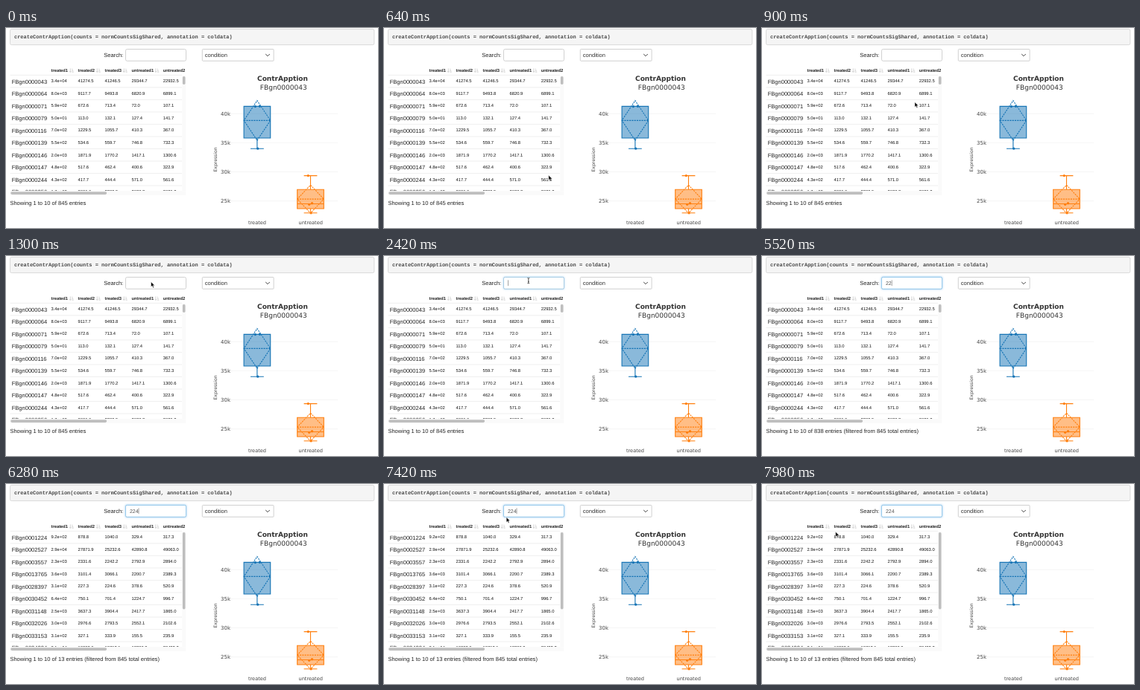
Write an HTML page that moves like this. It is 499x269 px and loops after 8 s.

```html
<!DOCTYPE html>
<html lang="en">
<head>
<meta charset="utf-8">
<title>Expression table and box plot</title>
<style>
html, body { margin: 0; width: 100%; height: 100%; overflow: hidden; background: #fff; }
svg { display: block; width: 499px; height: 269px; text-rendering: geometricPrecision; }
text { font-family: "Liberation Sans", Arial, sans-serif; font-size: 7.56px; fill: #222; white-space: pre; }
.code { font: bold 6.98px "Liberation Mono", monospace; fill: #484848; }
.value { font-size: 5.8px; fill: #111; }
.head { font-size: 5.8px; font-weight: bold; }
.field { fill: #fff; stroke: #c6c6c6; stroke-width: .8; }
.entry { font-size: 6.95px; fill: #555; }
.plot text { font-family: "DejaVu Sans", Verdana, sans-serif; font-size: 6.6px; fill: #444; text-anchor: middle; }
.plot .tick { font-size: 7px; text-anchor: end; }
.plot .title { font-size: 9.03px; fill: #333; }
.plot .axis { font-size: 6.1px; }
.bar { fill: #bebebe; }
.rule { stroke: #e4e4e4; stroke-width: .6; }
</style>
</head>
<body>
<svg viewBox="0 0 499 269">
  <defs>
    <clipPath id="tableClip"><rect x="5" y="62" width="231" height="157"/></clipPath>
    <filter id="blur" x="-10%" y="-50%" width="120%" height="200%"><feGaussianBlur stdDeviation="1.2"/></filter>
  </defs>
  <rect x="5.5" y="1.6" width="488.4" height="21" rx="2" fill="#f5f5f5" stroke="#ccc" stroke-width=".7"/>
  <text class="code" x="11" y="14.4">createContrApption(counts = normCountsSigShared, annotation = coldata)</text>

  <text x="131.2" y="38.9">Search:</text>
  <rect class="field" x="160.5" y="28.5" width="81" height="15.8" rx="2"/>
  <g id="focus" opacity="0">
    <rect x="160.5" y="28.5" width="81" height="15.8" rx="2" fill="none" stroke="#66afe9" stroke-opacity=".55" stroke-width="1.8" filter="url(#blur)"/>
    <rect x="160.5" y="28.5" width="81" height="15.8" rx="2" fill="#fff" stroke="#84c3ec" stroke-width=".8"/>
  </g>
  <text id="query" class="entry" x="166" y="39"></text>
  <rect id="caret" y="32.4" width=".6" height="7.8" fill="#666"/>

  <rect class="field" x="263.3" y="28.5" width="95.8" height="15.8" rx="1"/>
  <text x="266.8" y="38.9" style="fill:#333">condition</text>
  <path d="M348.2 35l2.8 2.8 2.8-2.8" fill="none" stroke="#444" stroke-width="1"/>

  <g id="header"></g>
  <path class="rule" d="M5.5 63.4H236"/>
  <g clip-path="url(#tableClip)"><g id="allRows"></g><g id="foundRows"></g></g>
  <rect x="236.2" y="64" width="5" height="155" fill="#fafafa"/>
  <rect x="5.5" y="219.2" width="235.7" height="5.6" fill="#fafafa"/>
  <rect id="thumb" class="bar" x="236.9" y="65" width="3.6" rx="1.8"/>
  <rect class="bar" x="6.2" y="220.3" width="129" height="3.6" rx="1.8"/>
  <text id="info" x="5.4" y="237.7"></text>

  <g class="plot" id="plot">
    <text class="title" x="371" y="70.8" font-weight="bold">ContrApption</text>
    <text class="title" x="372.3" y="83">FBgn0000043</text>
    <text class="axis" transform="translate(282.5 177) rotate(-90)">Expression</text>
    <text x="337" y="264.2">treated</text>
    <text x="408.7" y="264.2">untreated</text>
  </g>

  <g id="cursor">
    <path id="arrow" d="M0 0V6.7L1.6 5.3 2.7 7.9 3.9 7.4 2.8 4.9H4.9Z" fill="#000" stroke="#fff" stroke-width=".5"/>
    <path id="beam" d="M-1.4-3.6Q0-3.6 0-2.8 0-3.6 1.4-3.6M0-2.8V2.8M-1.4 3.6Q0 3.6 0 2.8 0 3.6 1.4 3.6M-.8 1.2H.8" fill="none" stroke="#222" stroke-width=".8"/>
  </g>
</svg>
<script>
const LOOP = 8000;
const $ = id => document.getElementById(id);

function add(parent, tag, attrs, content) {
  const node = document.createElementNS("http://www.w3.org/2000/svg", tag);
  for (const key in attrs) node.setAttribute(key, attrs[key]);
  if (content) node.textContent = content;
  parent.appendChild(node);
  return node;
}

// Table
const columns = [60.5, 96.5, 132.5, 168.5, 210.7];
const headings = ["treated1", "treated2", "treated3", "untreated1", "untreated2"];
const rowHeight = 16.52;
const allData = `FBgn0000043 3.4e+04 41274.5 41246.5 29344.7 22932.5
FBgn0000064 8.0e+03 9117.7 9493.8 6820.9 6899.1
FBgn0000071 5.9e+02 672.6 713.4 72.0 107.1
FBgn0000079 5.0e+01 113.0 132.1 127.4 141.7
FBgn0000116 7.0e+02 1229.5 1055.7 410.3 367.0
FBgn0000139 5.5e+02 534.6 559.7 746.8 732.3
FBgn0000146 2.0e+03 1871.9 1770.2 1417.1 1300.6
FBgn0000147 4.8e+02 517.6 462.4 400.6 322.9
FBgn0000244 4.3e+02 417.7 444.4 571.0 561.6
FBgn0000256 1.7e+03 2086.0 2209.5 2630.3 2636.2`;
const foundData = `FBgn0001224 9.2e+02 878.8 1040.0 329.4 317.3
FBgn0002527 2.9e+04 27871.9 25232.6 42890.8 49063.0
FBgn0003557 2.3e+03 2331.6 2242.2 2792.9 2894.0
FBgn0013765 3.6e+03 3101.4 3066.1 2200.7 2389.3
FBgn0028397 3.1e+02 227.3 224.6 378.6 520.9
FBgn0030452 6.4e+02 750.1 701.4 1224.7 996.7
FBgn0031148 2.5e+03 3637.3 3904.4 2417.7 1865.0
FBgn0032026 3.0e+03 2976.6 2793.5 2552.1 2102.6
FBgn0033153 3.1e+02 327.1 333.9 155.5 235.9
FBgn0034224 2.1e+04 10382.0 10713.1 18200.9 20432.2`;

headings.forEach((name, i) => {
  const x = columns[i];
  add($("header"), "text", { class: "head", x, y: 59.1 }, name);
  if (i === 4) return;
  const left = x + (i === 3 ? 31.3 : 24.8);
  add($("header"), "path", {
    d: `M${left + 1} 54.4v5m-1.1-1.3l1.1 1.4 1.1-1.4M${left + 3} 55h1m-1 1.4h1.5m-1.5 1.4h2m-2 1.4h2.5`,
    fill: "none", stroke: "#bbb", "stroke-width": .6
  });
});

function fillRows(group, data) {
  data.split("\n").forEach((line, i) => {
    const [name, ...values] = line.split(" "), y = 63.4 + rowHeight * i;
    add(group, "text", { x: 7.7, y: y + 11.1 }, name);
    values.forEach((v, c) => add(group, "text", { class: "value", x: columns[c], y: y + 10 }, v));
    add(group, "path", { class: "rule", d: `M5.5 ${y + rowHeight}H236` });
  });
}
fillRows($("allRows"), allData);
fillRows($("foundRows"), foundData);

// Box plot, values in thousands
const plot = $("plot");
const yOf = v => 115.3 + (40 - v) * 7.82;
for (const v of [40, 35, 30, 25]) {
  add(plot, "path", { d: `M302 ${yOf(v)}H445`, stroke: "#eee", "stroke-width": .6 });
  add(plot, "text", { class: "tick", x: 301, y: yOf(v) + 2.3 }, v + "k");
}

function drawBox(x, color, values, jitter) {
  const n = values.length;
  const quantile = p => {
    const pos = Math.max(0, Math.min(n - 1, p * n - .5)), k = Math.floor(pos);
    return values[k] + (pos - k) * ((values[k + 1] ?? values[k]) - values[k]);
  };
  const mean = values.reduce((a, b) => a + b) / n;
  const sd = Math.sqrt(values.reduce((s, v) => s + (v - mean) ** 2, 0) / n);
  const [low, q1, median, q3, high, mid, top, bottom] =
    [values[0], quantile(.25), quantile(.5), quantile(.75), values[n - 1], mean, mean + sd, mean - sd].map(yOf);
  const l = x - 17.8, r = x + 17.8;
  const line = { stroke: color, "stroke-width": 1.1 };
  add(plot, "path", {
    ...line, fill: color, "fill-opacity": .5,
    d: `M${l} ${q3}H${r}V${q1}H${l}ZM${l} ${median}H${r}M${x} ${q1}V${low}M${x} ${q3}V${high}M${x - 8.9} ${low}h17.8M${x - 8.9} ${high}h17.8`
  });
  add(plot, "path", {
    ...line, fill: "none", "stroke-dasharray": "2.2 1.1",
    d: `M${l} ${mid}H${r}L${x} ${top} ${l} ${mid} ${x} ${bottom} ${r} ${mid}`
  });
  values.forEach((v, i) => add(plot, "circle", { cx: x + jitter[i], cy: yOf(v), r: 1.65, fill: color }));
}
drawBox(336.9, "#1674b5", [34, 41.2465, 41.2745], [.8, -2.5, 3.5]);
drawBox(408.5, "#ff7f0e", [22.9325, 24.4, 24.6, 29.3447], [.6, -1.8, 2, -3.2]);

// Animation
const clamp = v => Math.max(0, Math.min(1, v));
const span = (t, a, b) => clamp((t - a) / (b - a));
const mix = (a, b, k) => a.map((v, i) => v + (b[i] - v) * k);
const show = (id, on) => $(id).setAttribute("visibility", on ? "visible" : "hidden");
const caretOn = [[2300, 3000], [3600, 4360], [5060, 5760], [6280, 6460], [7140, 7780]];

function pointer(t) {
  if (t < 1300) return mix([232, 268], [194.5, 34.8], 1 - (1 - span(t, 500, 1300)) ** 1.84);
  if (t < 7140) return mix([194.5, 34.8], [193.8, 33.2], span(t, 1300, 1460));
  if (t < 7780) return mix([193.8, 33.2], [114.5, 64], span(t, 7120, 7640) ** 1.8);
  return mix([114.5, 64], [98.6, 64.2], span(t, 7760, 7980));
}

function render(t) {
  const typed = [5060, 5520, 6280].filter(at => t >= at).length;
  const found = typed === 3;
  $("query").textContent = "224".slice(0, typed);
  $("caret").setAttribute("x", 166.1 + typed * 3.865);
  show("caret", caretOn.some(([a, b]) => t >= a && t < b));
  $("focus").setAttribute("opacity", span(t, 2280, 2480));
  show("allRows", !found);
  show("foundRows", found);
  $("thumb").setAttribute("height", found ? 103.5 : 11);
  const total = !typed ? 845 : found ? 13 : 838;
  $("info").textContent = `Showing 1 to 10 of ${total} entries` + (typed ? " (filtered from 845 total entries)" : "");

  const [x, y] = pointer(t);
  const visible = t >= 500 && t < 4800 || t >= 7140;
  const beam = t >= 1680 && y < 42;
  $("cursor").setAttribute("transform", `translate(${x} ${y})`);
  show("arrow", visible && !beam);
  show("beam", visible && beam);
}

const start = performance.now();
function tick() {
  render((performance.now() - start) % LOOP);
  requestAnimationFrame(tick);
}
tick();
</script>
</body>
</html>
```
